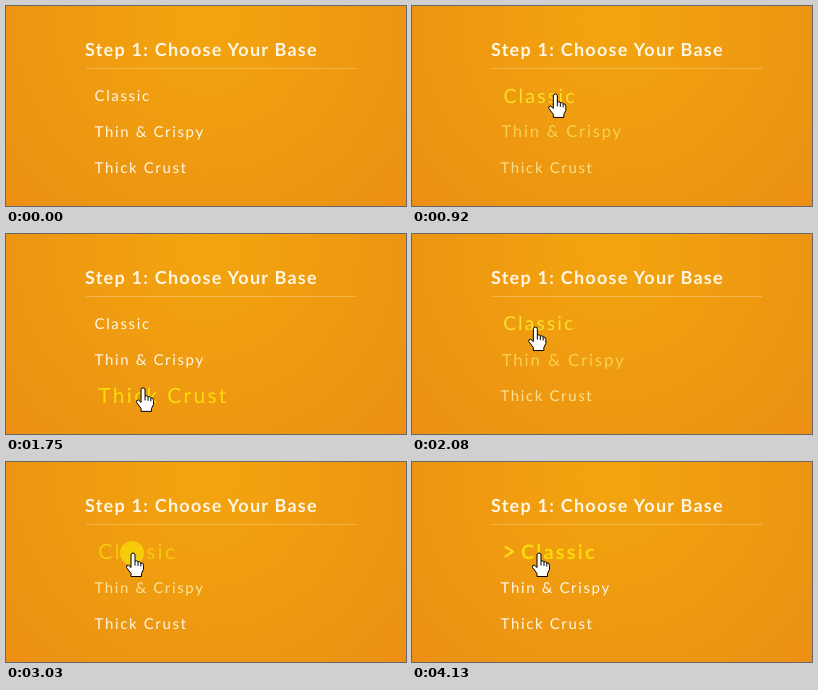
An HTML page for the animation above (4.32 s loop, 400 px wide and 200 px high).

```html
<!DOCTYPE html>
<html lang="en">
<head>
<meta charset="utf-8">
<title>Choose your base</title>
<style>
  html, body { margin: 0; width: 100%; height: 100%; overflow: hidden; background: #ee9713; }
  svg { display: block; width: 400px; height: 200px; }
  text { font-family: Lato, "Open Sans", sans-serif; text-rendering: geometricPrecision; }
  .title { font-size: 18px; font-weight: 700; letter-spacing: 1.25px; fill: #fff6e4; }
  .option { font-size: 15px; letter-spacing: 1.65px; }
</style>
</head>
<body>
<svg viewBox="0 0 400 200">
  <defs>
    <radialGradient id="glow" gradientUnits="userSpaceOnUse" cx="200" cy="15" r="265">
      <stop offset="0" stop-color="#f3a50e"/>
      <stop offset="1" stop-color="#eb9014"/>
    </radialGradient>
  </defs>
  <rect width="400" height="200" fill="url(#glow)"/>
  <text class="title" x="79" y="49.5">Step 1: Choose Your Base</text>
  <rect x="80" y="62" width="270" height="1" fill="#fff" opacity=".25"/>
  <g id="options"></g>
  <path id="chevron" d="M93.5 84.8L101 89.6L93.5 94.4" fill="none" stroke="#fbdf18"
    stroke-width="2" stroke-linecap="round" stroke-linejoin="round"/>
  <circle id="press" r="12" fill="#f6d408" opacity=".85"/>
  <g id="cursor" fill="#fff" stroke="#000" stroke-linejoin="round">
    <path id="arrow" d="M0 0V16L3.7 12.6L6.2 18.3L8.7 17.2L6.2 11.7H11.3Z"/>
    <g id="hand">
      <path d="M-2 1.5Q-2-.5 0-.5Q2-.5 2 1.5V7.6Q4 6.6 5 8.3Q7 7.6 7.8 9.4Q10.5 9 10.5 12V16L8.5 20V23H-2V20L-6.5 14Q-7 11.3-4.5 11.7L-2 14Z"/>
      <path d="M2 7.6V12M5 8.3V12.4M7.8 9.4V13" fill="none"/>
    </g>
  </g>
</svg>
<script>
const LOOP = 4320, STEP = 5;
const ENTER = 500, PRESS = 2990, RELEASE = 3260;
const LIST = { left: 79, right: 351, top: 90, row: 36 };
const SPRING = { speed: 21, damping: .8 };
const IDLE = [255, 246, 226], ACTIVE = [249, 219, 10];
const labels = ['Classic', 'Thin & Crispy', 'Thick Crust'];

const start = { x: 384, y: 168 };
const moves = [
  { from: 500, to: 960, x: 139, y: 87 },
  { from: 1040, to: 1510, x: 141, y: 172 },
  { from: 1580, to: 2130, x: 123, y: 92 },
  { from: 2150, to: 2440, x: 134, y: 159.5 },
  { from: 2470, to: 2870, x: 127, y: 91.5 }
];

const $ = id => document.getElementById(id);
const clamp = v => Math.min(1, Math.max(0, v));
const lerp = (a, b, p) => a + (b - a) * p;
const easeInOut = p => (1 - Math.cos(Math.PI * clamp(p))) / 2;
const easeOut = p => 1 - (1 - clamp(p)) ** 3;
const mix = p => `rgb(${IDLE.map((c, i) => Math.round(lerp(c, ACTIVE[i], p)))})`;
const rowY = i => LIST.top + i * LIST.row;

const texts = labels.map(label => {
  const el = document.createElementNS('http://www.w3.org/2000/svg', 'text');
  el.setAttribute('class', 'option');
  el.textContent = label;
  return $('options').appendChild(el);
});

function set(el, attributes) {
  for (const name in attributes) el.setAttribute(name, attributes[name]);
}

function pointerAt(t) {
  return moves.reduce((at, { from, to, x, y }) => {
    const p = easeInOut((t - from) / (to - from));
    return { x: lerp(at.x, x, p), y: lerp(at.y, y, p) };
  }, start);
}

// Replays the hover springs from the start of the loop, so the result depends on t alone.
function hoverAt(end) {
  const rows = labels.map(() => ({ growth: 0, speed: 0, over: false, since: -LOOP }));
  const dt = STEP / 1000;
  for (let t = ENTER; t <= end; t += STEP) {
    const { x, y } = pointerAt(t);
    // A grown row also reaches a little further
    const hit = x > LIST.right ? -1 : rows.findLastIndex((row, i) =>
      Math.abs(y - rowY(i)) < LIST.row / 2 + 4 * row.growth);
    rows.forEach((row, i) => {
      if (row.over !== (i === hit)) Object.assign(row, { over: i === hit, since: t });
      const pull = SPRING.speed ** 2 * (row.over - row.growth);
      row.speed += (pull - 2 * SPRING.damping * SPRING.speed * row.speed) * dt;
      row.growth += row.speed * dt;
    });
  }
  return rows;
}

function render(t) {
  const chosen = easeOut((t - RELEASE) / 760);
  const pressed = t >= PRESS && t < RELEASE;

  hoverAt(t).forEach(({ growth, over, since }, i) => {
    const age = t - since;
    const fade = over ? 0 : clamp(1 - age / 420);
    const selected = i === 0 ? chosen : 0;
    const scale = 1 + .4 * growth - .07 * selected;
    set(texts[i], {
      transform: `translate(${LIST.left} ${rowY(i)}) scale(${scale})`,
      x: 9.5 + 13 * selected,
      y: 5,
      fill: mix(over ? 1 - Math.exp(-age / 50) : .7 * fade),
      opacity: over && pressed ? .7 : 1 - .4 * fade,
      'font-weight': selected > 0 ? 700 : 400
    });
  });

  set($('chevron'), { opacity: chosen, transform: `translate(${8 * (chosen - 1)} 0)` });

  const { x, y } = pointerAt(t);
  const inside = x < LIST.right;
  set($('cursor'), {
    transform: `translate(${x} ${y})`,
    visibility: t < ENTER ? 'hidden' : 'visible'
  });
  set($('arrow'), { display: inside ? 'none' : 'inline' });
  set($('hand'), { display: inside ? 'inline' : 'none' });
  set($('press'), { cx: x - 1, cy: y - .5, display: pressed ? 'inline' : 'none' });
}

const origin = performance.now();
function tick() {
  render((performance.now() - origin) % LOOP);
  requestAnimationFrame(tick);
}
tick();
</script>
</body>
</html>
```
